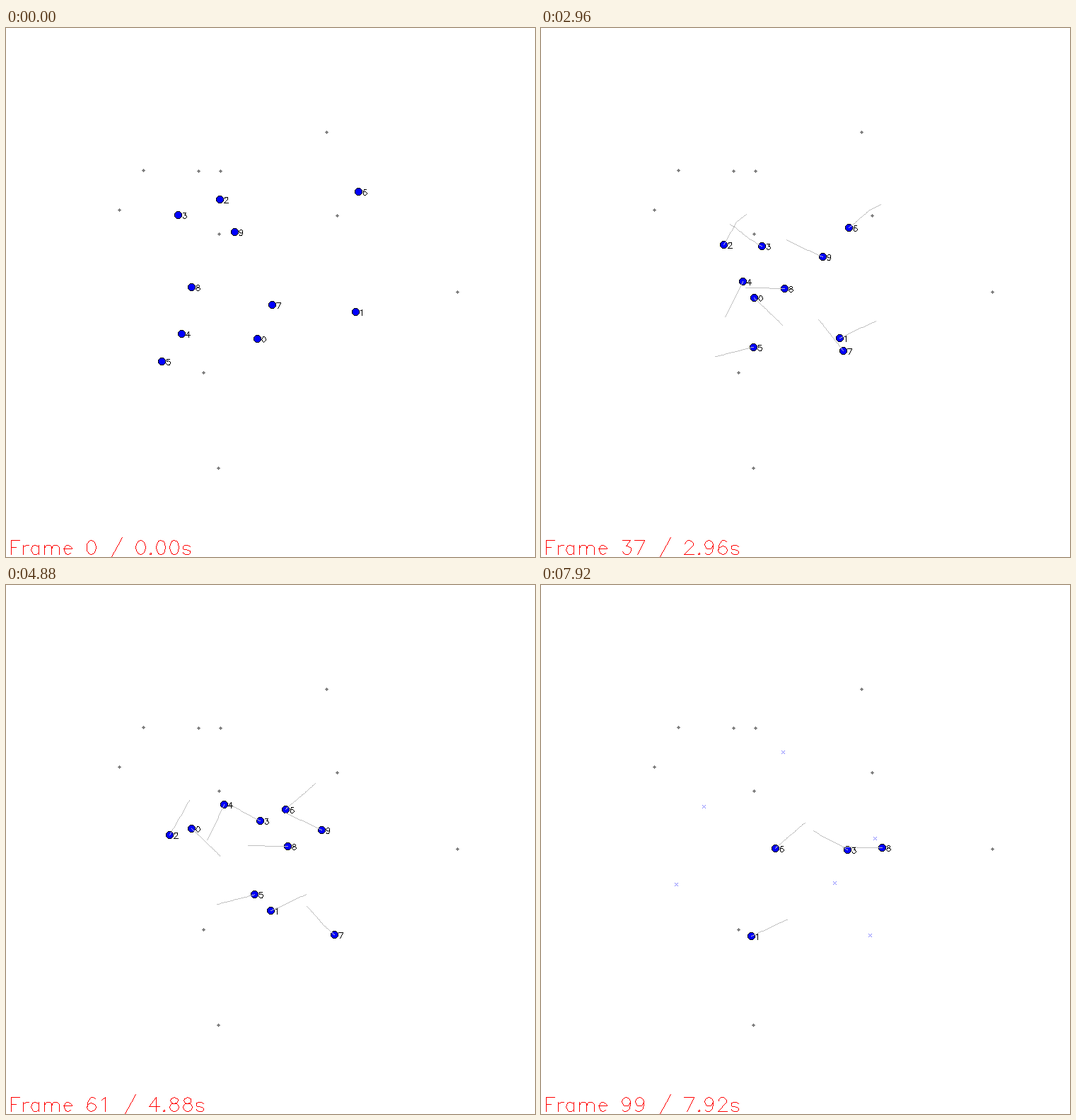
A matplotlib script that plays this animation: 748x748 px, repeating every 8 s.

```python
import matplotlib.pyplot as plt
import numpy as np
from matplotlib.animation import FuncAnimation

SIZE, FRAMES, INTERVAL = 748, 100, 80
SPEED, TRAIL = 2.225, 25  # pixels per frame, frames
BLACK, BLUE, RED = (0, 0, 0), (0, 0, 255), (255, 0, 0)
GRAY, PALE, FADED = (128,) * 3, (192,) * 3, (128, 128, 255)


def arc(cx, cy, rx, ry, start, stop):
    angle = np.radians(np.linspace(start, stop, 13))
    return list(zip(cx + rx * np.cos(angle), cy + ry * np.sin(angle)))


def ring(cx, cy, rx, ry):
    return arc(cx, cy, rx, ry, 0, 360)


# Single-stroke lettering: advance width and strokes, y up from the baseline.
SIX = [arc(12, 9, 8, 12, 60, 190), ring(10.3, 6.5, 6.4, 6.5)]
NINE = [[(20 - x, 21 - y) for x, y in stroke] for stroke in SIX]
DIGITS = [
    [ring(10, 10.5, 7, 10.5)],
    [[(6, 17), (11, 21), (11, 0)]],
    [arc(10, 15.5, 6, 5.5, 175, -25) + [(3, 0), (17, 0)]],
    [[(5, 21), (16, 21), (10, 13)] + arc(10.3, 6.5, 6.7, 6.5, 75, -155)],
    [[(13, 0), (13, 21), (3, 7), (18, 7)]],
    [[(15, 21), (5, 21), (4, 12)] + arc(10, 7, 7, 7, 140, -155)],
    SIX,
    [[(3, 21), (17, 21), (7, 0)]],
    [ring(10, 16.5, 5.5, 4.5), ring(10, 6, 7, 6)],
    NINE,
]
STEM = [(4, 14), (4, 0)]
GLYPHS = {str(n): (20, strokes) for n, strokes in enumerate(DIGITS)}
GLYPHS |= {
    " ": (16, []),
    ".": (10, [ring(5, 1, 1, 1)]),
    "/": (22, [[(20, 25), (2, -7)]]),
    "F": (18, [[(4, 0), (4, 21), (17, 21)], [(4, 11), (12, 11)]]),
    "r": (13, [STEM, arc(11, 8, 7, 6, 180, 80)]),
    "a": (19, [[(15, 14), (15, 0)], arc(9.5, 7, 6.3, 7, 35, 325)]),
    "m": (30, [STEM] + [arc(x - 5.5, 8.5, 5.5, 5.5, 180, 0) + [(x, 0)] for x in (15, 26)]),
    "e": (18, [[(3, 8), (15, 8)] + arc(9, 7, 6, 7, 10, 320)]),
    "s": (17, [arc(8.5, 10.5, 5.5, 3.5, 20, 270) + arc(8.5, 3.5, 5.5, 3.5, 90, -170)]),
}


def pixel(points):
    return np.floor(np.asarray(points) + 0.5).astype(int)


def draw_line(canvas, points, color):
    """One-pixel polyline with hard edges."""
    points = pixel(points)
    for a, b in zip(points, points[1:]):
        x, y = pixel(np.linspace(a, b, abs(b - a).max() + 1)).T
        inside = y < SIZE
        canvas[y[inside], x[inside]] = color


def draw_disc(canvas, center, radius, color):
    x, y = pixel(center)
    reach = int(radius)
    dy, dx = np.mgrid[-reach:reach + 1, -reach:reach + 1]
    filled = dx**2 + dy**2 <= radius**2
    canvas[y + dy[filled], x + dx[filled]] = color


def draw_cross(canvas, center, color, arm=2):
    x, y = pixel(center)
    for side in (-arm, arm):
        draw_line(canvas, [(x - arm, y - side), (x + arm, y + side)], color)


def draw_text(canvas, text, x, y, scale, color):
    for char in text:
        advance, strokes = GLYPHS[char]
        for stroke in strokes:
            draw_line(canvas, np.array(stroke) * (scale, -scale) + (x, y), color)
        x += advance * scale


class Agent:
    """Walks its route at constant speed and leaves a cross at the end."""

    def __init__(self, name, route):
        self.name = str(name)
        route = np.array(route)
        lengths = np.hypot(*np.diff(route, axis=0).T)
        travelled = np.concatenate([[0], np.cumsum(lengths)])
        walk = SPEED * np.arange(FRAMES)
        self.path = np.column_stack([np.interp(walk, travelled, axis) for axis in route.T])
        self.goal = route[-1]
        self.arrival = travelled[-1] / SPEED - 0.5

    def draw(self, canvas, frame):
        if frame >= self.arrival:
            draw_cross(canvas, self.goal, FADED)
            return
        x, y = pixel(self.path[frame])
        draw_disc(canvas, (x, y), 5.4, BLACK)
        draw_disc(canvas, (x, y), 4.5, BLUE)
        draw_text(canvas, self.name, x + 5, y + 5, 0.4, BLACK)
        draw_line(canvas, self.path[max(0, frame - TRAIL):frame + 1], PALE)


# Start, turning points and end of every walk.
ROUTES = [
    [(355, 439), (357, 435), (230, 313)],
    [(494, 401), (494, 404), (276, 506)],
    [(302, 242), (304, 242), (291, 262), (276, 274), (191, 423)],
    [(243, 264), (271, 279), (296, 299), (454, 385)],
    [(248, 432), (333, 261), (342, 236)],
    [(220, 471), (415, 421)],
    [(498, 231), (498, 234), (481, 248), (463, 258), (314, 386)],
    [(376, 391), (427, 456), (449, 481), (465, 495)],
    [(262, 366), (508, 372)],
    [(323, 288), (472, 358)],
]
LANDMARKS = [(453, 147), (194, 201), (272, 202), (303, 202), (160, 257),
             (468, 265), (301, 291), (638, 373), (279, 487), (300, 622)]

agents = [Agent(name, route) for name, route in enumerate(ROUTES)]
backdrop = np.full((SIZE, SIZE, 3), 255, np.uint8)
for landmark in LANDMARKS:
    draw_disc(backdrop, landmark, 2, GRAY)

fig = plt.figure(figsize=(SIZE / 72, SIZE / 72), dpi=72)
ax = fig.add_axes([0, 0, 1, 1])
ax.axis("off")
picture = ax.imshow(backdrop, interpolation="nearest")


def update(frame):
    canvas = backdrop.copy()
    for agent in agents:
        agent.draw(canvas, frame)
    caption = f"Frame {frame} / {frame * INTERVAL / 1000:.2f}s"
    draw_text(canvas, caption, 3, 744, 0.945, RED)
    picture.set_data(canvas)
    return [picture]


animation = FuncAnimation(fig, update, frames=FRAMES, interval=INTERVAL,
                          init_func=lambda: update(0), repeat=True, repeat_delay=0)
plt.show()
```
